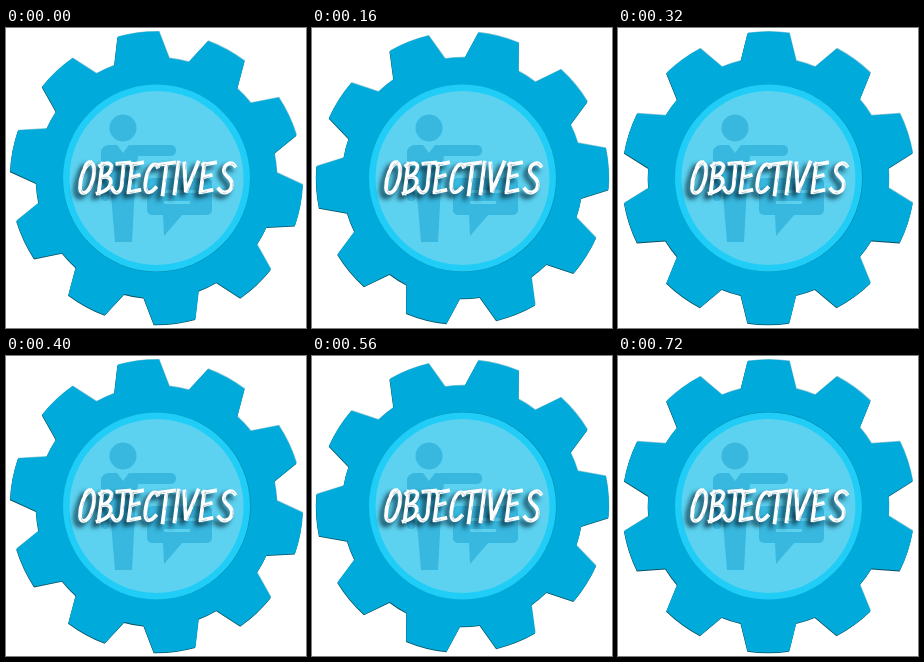
An HTML page with a canvas for the animation above (800 ms loop, 300 by 300 pixels).

```html
<!DOCTYPE html>
<html lang="en">
<head>
<meta charset="utf-8">
<title>Objectives</title>
<style>
  html, body { margin: 0; width: 100%; height: 100%; overflow: hidden; background: #fff; }
  canvas { display: block; width: 300px; height: 300px; }
</style>
</head>
<body>
<canvas id="stage" width="300" height="300" role="img" aria-label="OBJECTIVES"></canvas>
<script>
const ctx = document.getElementById('stage').getContext('2d');
const TAU = Math.PI * 2;
const CENTER = { x: 150.5, y: 150 };
const TEETH = 10;
const STEP_MS = 80;
const STEPS = 10;
const STEP_ANGLE = TAU / TEETH / 5;
const PANEL = '#5cd2f0';
const FIGURE = '#38b8df';

function makeGear() {
  const path = new Path2D();
  const tip = 146.4, root = 120.5, tipHalf = 0.143, rootHalf = 0.232;
  const point = (r, a) => path.lineTo(r * Math.sin(a), -r * Math.cos(a));
  for (let i = 0; i < TEETH; i++) {
    const a = i * TAU / TEETH;
    const next = a + TAU / TEETH - rootHalf;
    point(root, a - rootHalf);
    point(tip, a - tipHalf);
    path.arc(0, 0, tip, a - tipHalf - TAU / 4, a + tipHalf - TAU / 4);
    point(root, a + rootHalf);
    path.arc(0, 0, root, a + rootHalf - TAU / 4, next - TAU / 4);
  }
  path.closePath();
  return path;
}

// Brush lettering: [x position, strokes in a 14 x 31 box]
const LETTERS = [
  [74, 'M9 1C3 4 0 15 1 25C2 32 8 31 11 23C14 14 14 3 9 1C7 0 5 2 4 5'],
  [92, 'M3 2L2 30M1 4C9 -1 14 3 11 9C10 12 6 14 3 15C11 13 14 17 12 23C10 27 6 29 1 30'],
  [107, 'M3 2L14 1M9 2L9 23C8 31 3 31 0 25'],
  [123, 'M2 2L1 29M1 3L11 1M2 15L9 13M1 29L11 27'],
  [139, 'M11 5C8 -1 2 5 1 17C0 30 5 32 11 25'],
  [152, 'M0 3L14 1M7 3L6 31'],
  [168, 'M3 1L2 30'],
  [176, 'M1 2L5 29L14 1'],
  [195, 'M2 2L1 29M1 3L12 1M2 15L9 13M1 29L11 27'],
  [214, 'M13 4C9 -1 3 3 3 8C3 14 12 15 12 22C12 29 5 32 0 26']
];

function makeLettering() {
  const path = new Path2D();
  for (const [x, strokes] of LETTERS) {
    path.addPath(new Path2D(strokes), new DOMMatrix([1.05, 0, -0.1, 1.06, x + 1.5, 133.5]));
  }
  return path;
}

const gear = makeGear();
const lettering = makeLettering();

function disc(x, y, r, color) {
  ctx.fillStyle = color;
  ctx.beginPath();
  ctx.arc(x, y, r, 0, TAU);
  ctx.fill();
}

function box(x, y, w, h, r) {
  ctx.beginPath();
  ctx.roundRect(x, y, w, h, r);
  ctx.fill();
}

function drawGear(angle) {
  const layer = (dx, dy, color) => {
    ctx.save();
    ctx.translate(CENTER.x + dx, CENTER.y + dy);
    ctx.rotate(angle);
    ctx.fillStyle = color;
    ctx.fill(gear);
    ctx.restore();
  };
  layer(0.4, -0.7, '#8fc6d4');
  layer(-0.3, 0.8, '#07505f');
  layer(0, 0, '#00abdb');
}

function drawBadge(angle) {
  // The shaded side of the rim turns with the badge
  disc(CENTER.x + 0.8 * Math.sin(angle), CENTER.y - 0.8 * Math.cos(angle), 93.5, '#0793bc');
  disc(CENTER.x, CENTER.y, 93.5, '#1fcdf6');
  disc(CENTER.x, CENTER.y, 87, PANEL);
}

function drawPresenter() {
  disc(117, 100, 13.5, FIGURE);
  box(95, 117, 37, 20, 8);
  box(95, 120, 8, 53, 4);
  box(124, 117, 46, 11, 5);
  ctx.fill(new Path2D('M101 120H131L126 214H109Z'));

  box(141, 150, 65, 37, 5);
  ctx.fill(new Path2D('M157 186H177L158 208Z'));
  ctx.fillStyle = PANEL;
  ctx.fill(new Path2D('M111 117H123L117 125Z'));
  box(158, 162, 32, 3, 1);
  box(158, 173, 26, 3, 1);
}

function drawLettering() {
  ctx.save();
  ctx.lineCap = 'square';
  ctx.lineJoin = 'bevel';
  ctx.shadowColor = 'rgba(0, 32, 48, 0.92)';
  ctx.shadowBlur = 5;
  ctx.shadowOffsetX = -4;
  ctx.shadowOffsetY = 4;
  ctx.strokeStyle = '#fff';
  ctx.lineWidth = 3.8;
  ctx.stroke(lettering);
  // Dry bristle marks
  ctx.shadowColor = 'transparent';
  ctx.strokeStyle = 'rgba(95, 135, 150, 0.55)';
  ctx.lineWidth = 0.7;
  ctx.setLineDash([5, 9, 3, 13]);
  ctx.translate(1, 0.5);
  ctx.stroke(lettering);
  ctx.restore();
}

function draw() {
  const step = Math.floor(performance.now() / STEP_MS) % STEPS;
  ctx.fillStyle = '#fff';
  ctx.fillRect(0, 0, 300, 300);
  drawGear(-STEP_ANGLE * (step + 1));
  drawBadge(TAU / 2 * (1 - step / STEPS));
  drawPresenter();
  drawLettering();
  requestAnimationFrame(draw);
}

draw();
</script>
</body>
</html>
```
